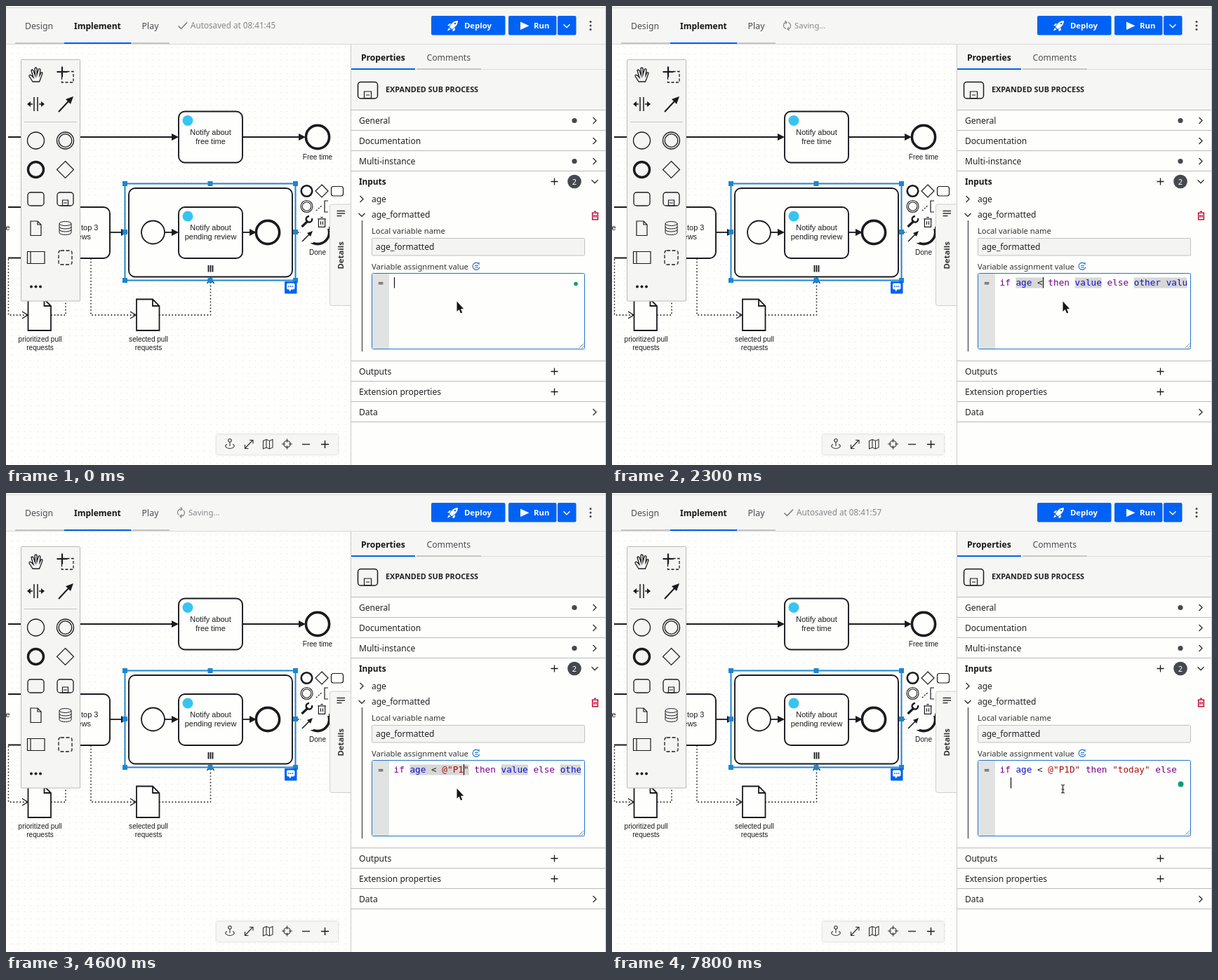
Recreate the animation shown at these times as an HTML page with a canvas. Size 855 by 655 pixels, loop 8000 ms.

```html
<!DOCTYPE html>
<html lang="en">
<head>
<meta charset="utf-8">
<title>Process editor</title>
<style>
html, body { margin: 0; width: 100%; height: 100%; overflow: hidden; background: #fefefc; }
canvas { display: block; }
</style>
</head>
<body>
<canvas id="stage" width="855" height="655"></canvas>
<script>
const ctx = document.getElementById('stage').getContext('2d');
const LOOP = 8000, INK = '#1b1b1f', GREY = '#45484d', BLUE = '#0062f5', PICK = '#1c86d1',
  RED = '#c0103a', LINE = '#b9bbbd', BAR = '#f6f6f4', PAPER = '#fefefc';
const SANS = '"Noto Sans", "Open Sans", sans-serif';
const ARIAL = '"Liberation Sans", Arial, sans-serif';
const MONO = '"DejaVu Sans Mono", monospace';
const CHAR = 7.65, CODE_X = 552.5, CODE_FONT = '12.7px ' + MONO;

// Braces mark template fields, brackets a selection, the bar is the caret.
const REST = ' then {value} else {other value}';
const P1D = 'if {age < @"P1D"} then ';
const OTHER = ' else {other value}';
const A_LIST = ['xage', 'xage_formatted', 'ƒabs()', 'ƒabs()', 'ƒafter()', 'ƒall()'];
const typing = [
  [0, '|'],
  [400, 'i|'],
  [500, 'if|', ['kif', 'kif'], 2],
  [800, 'if {[condition]}' + REST],
  [1000, 'if {a|}' + REST],
  [1200, 'if {a|}' + REST, A_LIST, 1],
  [1600, 'if {ag|}' + REST, A_LIST.slice(0, 2), 2],
  [1700, 'if {age|}' + REST, A_LIST.slice(0, 2), 3],
  [2000, 'if {age|}' + REST],
  [2100, 'if {age |}' + REST],
  [2300, 'if {age <|}' + REST],
  [3300, 'if {age < |}' + REST],
  [3500, 'if {age < @|}' + REST],
  [3600, 'if {age < @"|"}' + REST],
  [4100, 'if {age < @"P|"}' + REST],
  [4600, 'if {age < @"P1|"}' + REST],
  [4800, 'if {age < @"P1D|"}' + REST],
  [5500, P1D + '{[value]}' + OTHER],
  [5700, P1D + '{"|"}' + OTHER],
  [6200, P1D + '{"t|"}' + OTHER],
  [6400, P1D + '{"to|"}' + OTHER],
  [6500, P1D + '{"tod|"}' + OTHER],
  [6600, P1D + '{"toda|"}' + OTHER],
  [6800, P1D + '{"today|"}' + OTHER],
  [7500, P1D + '{"today"} else {[other value]}'],
  [7600, 'if age < @"P1D" then "today" else |'],
  [7800, 'if age < @"P1D" then "today" else \n  |']
];
const saves = [[0, 45], [1000, 0], [1500, 51], [2300, 0], [2700, 52], [3400, 0], [4300, 53],
  [4600, 0], [5400, 54], [5500, 0], [6200, 55], [6300, 0], [6600, 56], [7400, 0], [7800, 57]];
const errors = [[0, 0], [800, 1], [2000, 0], [3100, 1], [3700, 0]];
const spins = [[1000, 1300], [2300, 2700], [3100, 3800], [4000, 4300], [4600, 5400],
  [5500, 5700], [6200, 6600], [7400, 7600]];
const at = (rows, t) => rows.filter(r => r[0] <= t).pop();

function pen(d, color = INK, w = 1.2, dash = []) {
  ctx.strokeStyle = color;
  ctx.lineWidth = w;
  ctx.setLineDash(dash);
  ctx.stroke(new Path2D(d));
  ctx.setLineDash([]);
}
function fill(d, color = INK) {
  ctx.fillStyle = color;
  ctx.fill(new Path2D(d));
}
function box(x, y, w, h, r, bg, edge, lw = 1) {
  ctx.beginPath();
  ctx.roundRect(x, y, w, h, r);
  if (bg) { ctx.fillStyle = bg; ctx.fill(); }
  if (edge) { ctx.strokeStyle = edge; ctx.lineWidth = lw; ctx.stroke(); }
}
function ring(x, y, r, lw, color = INK, bg) {
  ctx.beginPath();
  ctx.arc(x, y, r, 0, 7);
  if (bg) { ctx.fillStyle = bg; ctx.fill(); }
  if (lw) { ctx.strokeStyle = color; ctx.lineWidth = lw; ctx.stroke(); }
}
function text(s, x, y, font, color = INK, align = 'left') {
  ctx.font = font;
  ctx.fillStyle = color;
  ctx.textAlign = align;
  ctx.fillText(s, x, y);
}
const sans = (s, x, y, size = 12, color = '#202124', weight = 400) =>
  text(s, x, y, `${weight} ${size}px ${SANS}`, color);
const label = (s, x, y, size = 10.95) => text(s, x, y, `${size}px ${ARIAL}`, INK, 'center');
const plus = (x, y, r = 5, w = 1.3) => pen(`M${x - r} ${y}h${2 * r}M${x} ${y - r}v${2 * r}`, INK, w);
const right = (x, y) => pen(`M${x - 2.5} ${y - 4.5}l4.5 4.5l-4.5 4.5`, '#333', 1.4);
const down = (x, y, c = '#333') => pen(`M${x - 4.5} ${y - 2.2}l4.5 4.5l4.5-4.5`, c, 1.4);
const diamond = (x, y, r) => pen(`M${x} ${y - r}l${r} ${r}l${-r} ${r}l${-r} ${-r}z`);
const trash = (x, y, k, c, w = 1.2) =>
  pen(`M${x - 5 * k} ${y - 4 * k}h${10 * k}M${x - 1.5 * k} ${y - 6 * k}h${3 * k}M${x - 4 * k} ${y - 4 * k}v${10 * k}h${8 * k}v${-10 * k}M${x - 1.3 * k} ${y - k}v${4 * k}M${x + 1.3 * k} ${y - k}v${4 * k}`, c, w);

function flow(x1, x2, y) {
  pen(`M${x1} ${y}H${x2 - 4}`, INK, 1.8);
  fill(`M${x2} ${y}l-10-5v10z`);
}
function task(x, y, lines) {
  box(x, y, 91, 73, 9, PAPER, INK, 1.9);
  lines.forEach((s, i) => label(s, x + 45.5, y + 33 + i * 13.3));
}
function dataDoc(x, lines) {
  const d = `M${x} 418.5h23l9.5 9.5v35h-32.5z`;
  fill(d, PAPER);
  pen(d + `M${x + 23} 418.5v9.5h9.5`, INK, 1.8);
  lines.forEach((s, i) => label(s, x + 17, 479 + i * 12.2, 10.04));
}
const chatTask = (y, lines) => {
  task(246, y, lines);
  ring(259, y + 13, 7.5, 0, INK, '#36c5f0');
};

function diagram() {
  ctx.fillStyle = PAPER;
  ctx.fillRect(0, 0, 855, 655);
  ctx.fillStyle = '#dededc';
  for (let x = 8; x < 492; x += 9.125)
    for (let y = 59; y < 655; y += 9.125) ctx.fillRect(Math.round(x), Math.round(y), 1, 1);

  flow(3, 246, 187);
  flow(337, 427, 187);
  chatTask(150.5, ['Notify about', 'free time']);
  ring(444, 187, 16.6, 3.6, INK, PAPER);
  label('Free time', 444, 219, 10.04);

  ring(444, 323, 16.6, 3.6, INK, PAPER);
  label('Done', 444, 355, 10.04);

  ctx.fillStyle = PAPER;
  ctx.fillRect(3, 287, 22, 73);
  pen('M3 287h27M3 359.5h27', INK, 1.9);
  text('e', 5.5, 320, '10.95px ' + ARIAL, INK, 'right');
  task(57, 287, ['Select top 3', 'reviews']);
  flow(148, 174, 323);

  box(175, 260, 233, 126.5, 9, PAPER, INK, 1.9);
  ring(209.5, 323, 16.5, 1.8, INK, PAPER);
  flow(226, 246, 323);
  chatTask(287, ['Notify about', 'pending review']);
  flow(337, 357, 323);
  ring(373, 323, 16.6, 3.6, INK, PAPER);
  pen('M288.5 370v9.5M291.5 370v9.5M294.5 370v9.5', INK, 1.8);

  ctx.lineCap = 'round';
  pen('M3.5 362V441H30M65 441H85V360M121 361V441H184M219 441H291.5V389', INK, 1.8, [0, 4.56]);
  ctx.lineCap = 'butt';
  pen('M23 436l8 5l-8 5M177 436l8 5l-8 5M286.5 396l5-8l5 8', INK, 1.4);
  dataDoc(31.5, ['prioritized pull', 'requests']);
  dataDoc(186, ['selected pull', 'requests']);

  pen('M169.5 253.5H412.5V391.5H169.5Z', PICK, 2);
  ctx.fillStyle = PICK;
  for (const x of [169.5, 291, 412.5])
    for (const y of [253.5, 322.5, 391.5])
      if (x !== 291 || y !== 322.5) ctx.fillRect(x - 3.5, y - 3.5, 7, 7);
}

function contextPad() {
  ctx.fillStyle = PAPER;
  ctx.fillRect(418, 298, 42, 20);
  ctx.fillRect(418, 318, 20, 20);
  ring(428.5, 264, 7.8, 2.6);
  diamond(450, 264, 9);
  box(463.5, 257.5, 17, 13.5, 3, null, INK, 1.2);
  ring(428.5, 286, 8.5, 1.1);
  ring(428.5, 286, 6.3, 1.1);
  pen('M442 292l9-8', INK, 1.3, [2, 2]);
  pen('M459 278h-5v16h5', INK, 1.2);
  pen('M421.5 315l9-8.5', INK, 3.2);
  pen('M436 303a4.3 4.3 0 1 1-4-3', INK, 2.4);
  trash(450, 308.5, 1.15, INK);
  pen('M422 336l10-10', INK, 1.6);
  fill('M437 321l-3 8l-5-5z');
  pen('M416 323h4', INK, 1.4, [1.5, 2]);
  box(397, 393, 17.5, 17.5, 1, BLUE);
  fill('M400 397.5q0-2 2-2h7.5q2 0 2 2v5q0 2-2 2h-3l-2 3l-1-3h-1.5q-2 0-2-2z', '#fff');
  for (const x of [403, 405.8, 408.6]) ring(x, 400.2, 0.9, 0, INK, BLUE);
}

function palette() {
  box(21.5, 76.5, 84, 344.5, 1, '#f5f5f4', '#b9b9b9');
  pen('M26 165.5h75', '#c4c4c4', 1);
  pen('M38 108l-5-8q0-3 3-1l3 3l-3-10q1-2 3 0l2.5 7l-.5-10q1.5-2 3 0v9l2.5-8q2-1 2.5 1l-1 8l2-4q2-1 2 1l-2.5 7l-2 5z', INK, 1.3);
  pen('M80 93.5H96V109H79.5V94', INK, 1.3, [4, 2.5]);
  pen('M72.5 94h15M80 86.5v15', INK, 2.2);
  pen('M40 130v20M45 130v20', INK, 1.5);
  pen('M31 140h7M47 140h7', INK, 1.4);
  fill('M30 140l5-4v8zM55 140l-5-4v8z');
  pen('M75 151l14-15', INK, 2);
  fill('M96 129l-4 11l-7-7z');
  ring(42.5, 192, 12, 1.3);
  ring(84.5, 192, 12, 1.3);
  ring(84.5, 192, 9.3, 1.3);
  ring(42.5, 233.5, 11, 3.4);
  diamond(84.5, 233.5, 12);
  box(31, 266, 23, 19, 4, null, INK, 1.3);
  box(73, 266, 23, 19, 4, null, INK, 1.3);
  pen('M80.5 277h8v8h-8zM82 281h5');
  pen('M35 307h10l5 5v15.5h-15zM45 307v5h5');
  pen('M76 310.5a8.5 3 0 0 1 17 0v13a8.5 3 0 0 1-17 0zM76 310.5a8.5 3 0 0 0 17 0M76 315a8.5 3 0 0 0 17 0M76 319a8.5 3 0 0 0 17 0', INK, 1);
  pen('M30.5 350.5h24.5v17h-24.5zM35 350.5v17');
  pen('M78 349h13q3 0 3 3v14q0 3-3 3h-13q-3 0-3-3v-14q0-3 3-3z', INK, 1.3, [5, 2.5]);
  for (const x of [36, 42.5, 49]) ring(x, 400.5, 2, 0, INK, INK);
}

function zoomBar() {
  ctx.shadowColor = 'rgba(0,0,0,.25)';
  ctx.shadowBlur = 3;
  box(300, 611.5, 173, 28.5, 1, BAR);
  ctx.shadowBlur = 0;
  ctx.shadowColor = 'transparent';
  ring(319, 620, 2.2, 1.1, '#333');
  pen('M319 622v6M315 625.5c-5 2-1 6 4 6s9-4 4-6', '#333', 1.1);
  pen('M341 631l10-11M347 619.5h5v5M340.5 626v5.5h5', '#333', 1.2);
  pen('M366.5 620.5l4.5-2l4.5 2l4.5-2v11.5l-4.5 2l-4.5-2l-4.5 2zM371 618.5v11.5M375.5 620.5v11.5', '#333', 1.1);
  ring(400.5, 625, 4.7, 1.2, '#333');
  pen('M400.5 617.5v5M400.5 627.5v5M393 625h5M403 625h5', '#333', 1.2);
  pen('M422 625.5h11', '#333', 1.5);
  plus(454.5, 625.5, 5.5, 1.4);
}

function topBar(saved, turn) {
  ctx.fillStyle = BAR;
  ctx.fillRect(0, 0, 855, 54);
  pen('M0 2.5H855M0 54.5H855', '#d9d9d8', 1);
  pen('M13 53H83M180 53H233', '#c6c6c5', 2);
  pen('M83 53H178.5', BLUE, 2);
  sans('Design', 27, 33, 12.25, '#4c4e52');
  sans('Implement', 97, 33, 12, '#161616', 600);
  sans('Play', 193.5, 33, 12.4, '#4c4e52');
  if (saved) {
    pen('M245.5 28.5l4 4l8.5-9', '#777', 1.5);
    sans('Autosaved at 08:41:' + saved, 263, 32, 11.7, '#85878a');
  } else {
    ctx.save();
    ctx.translate(249.5, 28);
    ctx.rotate(turn);
    pen('M-4.5 1a4.7 4.7 0 0 1 8-4.5M4.5-1a4.7 4.7 0 0 1-8 4.5M4-6.5v3.5h-3.5M-4 6.5v-3.5h3.5', '#85878a', 1.2);
    ctx.restore();
    sans('Saving...', 260, 32, 11.4, '#85878a');
  }
  box(606, 14, 105.5, 27.5, 2, BLUE);
  box(716, 14, 68.5, 27.5, 2, BLUE);
  box(786, 14, 26.5, 27.5, 2, BLUE);
  fill('M633 28q4-7 11-7q0 7-7 11l-2 1l-3-3zM632 25l-3 3l3 .5l2-3.5zM640 31l-.5 4l-3 1v-3zM631 31l2.5 2.5l-4.5 2z', '#fff');
  ring(640, 25, 1.2, 0, INK, BLUE);
  sans('Deploy', 653, 32, 11.3, '#fff', 600);
  fill('M733 22.5l12.5 5.7l-12.5 5.7z', '#fff');
  sans('Run', 752, 32, 11.3, '#fff', 600);
  down(799, 28.5, '#fff');
  for (const y of [22.5, 28, 33.5]) ring(833, y, 1.5, 0, INK, GREY);
}

function panel(err) {
  const shift = err ? 23 : 0;
  box(461.5, 283, 36, 144.5, 3, BAR, '#cfcfce');
  pen('M471.5 292.5h11.5M471.5 296h11.5M471.5 299.5h7', '#333', 1.4);
  ctx.save();
  ctx.translate(481, 375.5);
  ctx.rotate(-Math.PI / 2);
  sans('Details', 0, 0, 11.3, '#333', 600);
  ctx.restore();

  ctx.fillStyle = PAPER;
  ctx.fillRect(492, 55, 363, 600);
  ctx.fillStyle = BAR;
  ctx.fillRect(492, 55, 363, 94);
  pen('M491.5 55V655M854.5 0V655', '#c9cacb', 1);
  pen('M678 90.5H854', '#dcdcdb', 1);
  pen('M585 90H677', '#c6c6c5', 2);
  pen('M492 90H583', BLUE, 2);
  sans('Properties', 506, 78, 12.1, '#161616', 600);
  sans('Comments', 599.5, 78, 12.2, '#4c4e52');
  box(501.5, 108.5, 28, 23.5, 4, null, INK, 1.5);
  pen('M510.5 122h10v9.5h-10zM513 127h5');
  sans('EXPANDED SUB PROCESS', 541, 123, 10.8, '#202124', 600);

  const tail = [507, 536, 565, 594].map(y => y + shift);
  for (const y of [149, 178, 207, 236, ...tail]) pen(`M492 ${y - 0.5}H854`, LINE, 1);
  ['General', 'Documentation', 'Multi-instance'].forEach((s, i) => {
    const y = 163.5 + i * 29;
    sans(s, 503, y + 4.5, 12.05);
    right(839, y);
    if (i !== 1) ring(810, y, 3.6, 0, INK, GREY);
  });
  sans('Inputs', 503, 255, 11.8, '#161616', 600);
  plus(781.5, 250.5);
  ring(810, 250.5, 9.8, 0, INK, GREY);
  text('2', 810, 254.5, '11px ' + SANS, '#fff', 'center');
  down(839, 250.5);
  right(507, 275.5);
  sans('age', 521, 279.5);
  down(507, 298);
  sans('age_formatted', 521, 302);
  trash(839.5, 299, 0.95, RED, 1.6);
  pen(`M507.5 306V${493 + shift}`, '#5a5c60', 1.5);
  sans('Local variable name', 521, 325, 11.2, '#333');
  box(521.5, 331.5, 303, 24.5, 1, '#f4f4f3', '#bfc1c3');
  sans('age_formatted', 527, 348);
  sans('Variable assignment value', 521, 375.5, 11.2, '#333');
  pen('M674.5 369a5 5 0 1 0 .3 4M668 370.5h5M668 373h5M672 367.5l3-1', '#1b6fd0', 1.2);

  ['Outputs', 'Extension properties', 'Data'].forEach((s, i) => {
    const y = 521.5 + i * 29 + shift;
    sans(s, 503, y + 4.5, 12.05);
    if (i < 2) plus(781.5, y); else right(839, y);
  });
  if (err) sans('Property <age_formatted> is not valid.', 521, 508, 11.2, RED);
}

function tint(word) {
  if (/^(if|then|else)$/.test(word)) return '#770088';
  if (/^[@"]/.test(word)) return '#a81010';
  return /^\w/.test(word) ? '#1010cf' : '#222';
}

function codeLines(src) {
  let row = 0, col = 0, plain = '', open = 0, from = 0;
  const marks = [], chosen = [];
  let caret = null;
  for (const c of src) {
    if (c === '{') open = col;
    else if (c === '}') marks.push([open, col]);
    else if (c === '[') from = col;
    else if (c === ']') chosen.push([from, col]);
    else if (c === '|') caret = [col, row];
    else {
      plain += c;
      col++;
      if (c === '\n') { row++; col = 0; }
    }
  }
  return { lines: plain.split('\n'), marks, chosen, caret };
}

function editor(src, err) {
  box(521.5, 381.5, 303, 108, 2, err ? '#fff0ee' : PAPER, err ? RED : '#2273c9', 1);
  ctx.fillStyle = err ? '#e3dfde' : '#e1e3e2';
  ctx.fillRect(522, 382, 24, 107);
  text('=', 534, 399, CODE_FONT, '#333', 'center');
  pen('M817 488l6.5-6.5M820.5 488l3-3', '#888', 1);

  const { lines, marks, chosen, caret } = codeLines(src);
  ctx.save();
  ctx.beginPath();
  ctx.rect(547, 384, 272, 104);
  ctx.clip();
  const paint = (spans, color) => spans.forEach(([a, b]) => {
    ctx.fillStyle = color;
    ctx.fillRect(CODE_X + a * CHAR, 387.5, (b - a) * CHAR, 15);
  });
  paint(marks, '#d6d7d6');
  paint(chosen, '#cfcdee');
  lines.forEach((s, i) => {
    for (const m of s.matchAll(/@?"\w*"|\w+|[@<]/g))
      text(m[0], CODE_X + m.index * CHAR, 399 + i * 19, CODE_FONT, tint(m[0]));
  });
  if (caret) {
    const x = Math.round(CODE_X + caret[0] * CHAR) + 0.5, y = 387 + caret[1] * 19;
    pen(`M${x} ${y}v15.5`, '#111', 1.2);
  }
  ctx.restore();
  if (lines.length > 1) ring(810.5, 415.5, 4, 0, INK, '#0f9d74');
  else if (lines[0].length < 34) ring(812, 396.5, 2.8, 0, INK, '#0f9d74');
}

function popup(items, typed, src) {
  const x = src.startsWith('if {') ? 576 : 553, y = 402.5, full = items.length > 5;
  const w = 229, h = full ? 127.5 : items.length * 20.8 + 0.5;
  box(x - 0.5, y, w - 1, h, 0, '#f4f5f4', '#bdbebe');
  ctx.fillStyle = '#0b7cc0';
  ctx.fillRect(x, y + 0.5, full ? 214 : w - 2, 20.3);
  items.forEach((item, i) => {
    const base = y + 15 + i * 20.8, color = i ? '#222' : '#fff', name = item.slice(1);
    text(item[0], x + 8, base, 'italic 10px ' + MONO, i ? '#777' : '#b8d9ee', 'center');
    text(name, x + 19, base, CODE_FONT, color);
    pen(`M${x + 19} ${base + 2}h${typed * CHAR}`, color, 1);
  });
  if (full) {
    ctx.fillStyle = '#f1f1f1';
    ctx.fillRect(x + 214, y + 0.5, 13, h - 1);
    ctx.fillStyle = '#c0c1c1';
    ctx.fillRect(x + 215.5, 416, 10, 67.5);
    fill(`M${x + 217} 412l3.5-4l3.5 4z`, '#999');
    fill(`M${x + 217} 521l3.5 4l3.5-4z`, '#444');
  }
  if (items[0] === 'xage') {
    box(400, 403.5, 175, 26, 0, '#f4f5f4', '#bdbebe');
    sans('Written in Activity_1nqmscz', 408, 421, 12.3, '#333');
  }
}

function pointer(beam) {
  if (beam) {
    pen('M640 416.5q2.5 0 2.5 1.5v8.5q0 1.5-2.5 1.5M645 416.5q-2.5 0-2.5 1.5M642.5 426.5q0 1.5 2.5 1.5M640.5 423h4', INK, 1.1);
    return;
  }
  const d = 'M642.5 421.5v14.5l3.2-3l2.3 5.5l2.2-1l-2.3-5.2h4.3z';
  pen(d, '#fff', 2);
  fill(d, '#161616');
}

function draw(t) {
  const [, src, items, typed] = at(typing, t);
  const err = at(errors, t)[1];
  const span = at(spins, t);
  const turn = span ? Math.min(t, span[1]) / 100 * 0.7 : 0;
  diagram();
  contextPad();
  if (err) {
    box(168, 394, 17.5, 17.5, 1, RED);
    ring(176.8, 402.8, 6, 1.3, '#fff');
    pen('M174.5 400.5l4.5 4.5M179 400.5l-4.5 4.5', '#fff', 1.4);
  }
  palette();
  zoomBar();
  topBar(at(saves, t)[1], turn - 1.4);
  panel(err);
  editor(src, err);
  if (items) popup(items, typed, src);
  pointer(t >= 7800);
}

let last = -1;
const start = performance.now();
function tick(now) {
  const t = Math.floor(Math.max(0, now - start) % LOOP / 100) * 100;
  if (t !== last) draw(last = t);
  requestAnimationFrame(tick);
}
draw(0);
requestAnimationFrame(tick);
</script>
</body>
</html>
```
